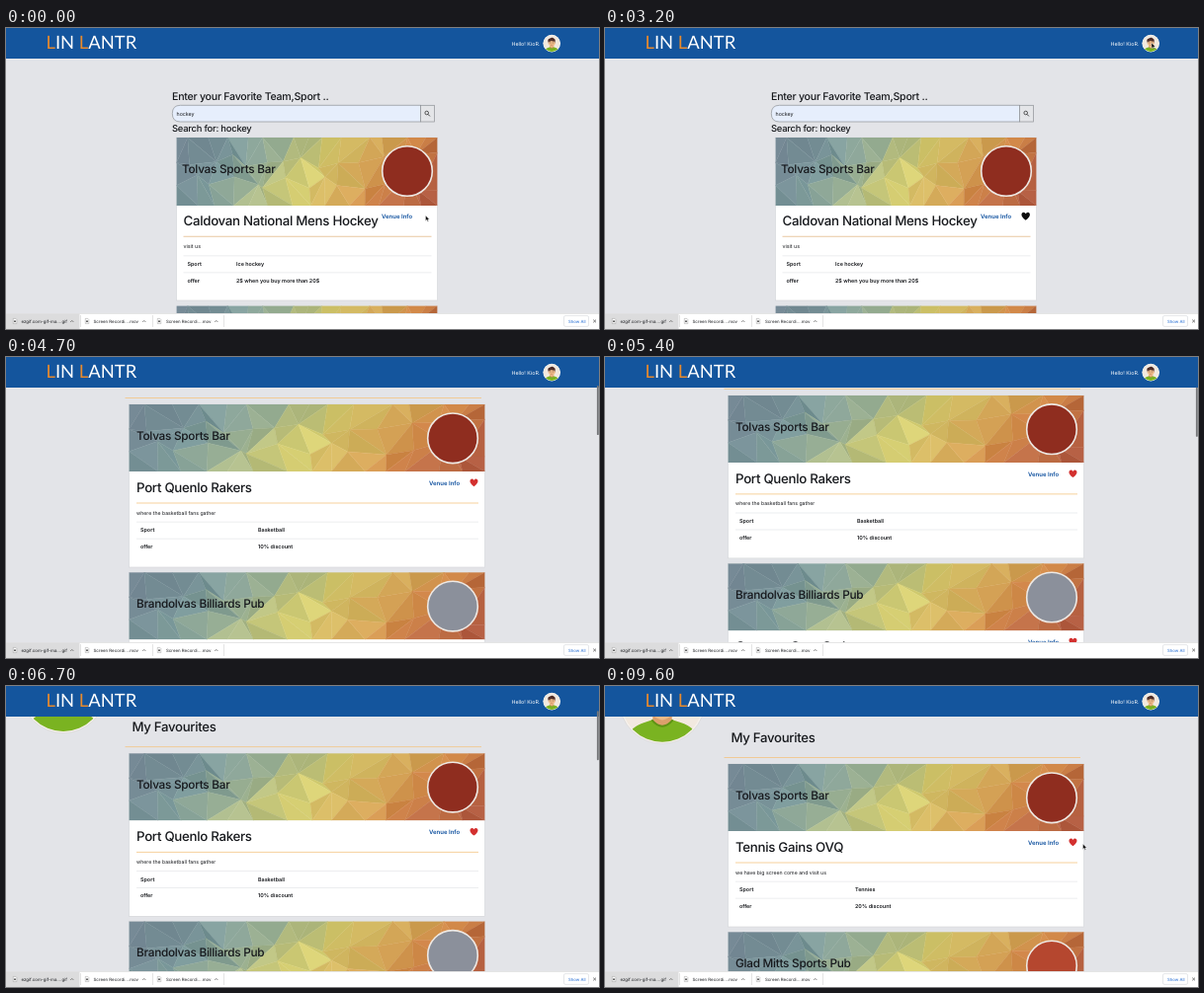
An HTML page for the animation above (9.7 s loop, 600 px wide and 305 px high).

```html
<!DOCTYPE html>
<html lang="en">
<head>
<meta charset="utf-8">
<title>Sports bar finder</title>
<style>
  html, body { margin: 0; width: 100%; height: 100%; overflow: hidden; background: #e3e4e8; }
  svg { display: block; width: 600px; height: 305px; }
  text { font-family: Inter, "Liberation Sans", sans-serif; fill: #16181c; text-rendering: geometricPrecision; white-space: pre; }
  .head { font-weight: 500; letter-spacing: -.023em; }
  .bold { font-weight: 600; }
  .link { font-weight: 600; fill: #0d4f9e; }
  .brand { font-family: Lato, sans-serif; fill: #fff; }
  .brand tspan { fill: #e88a2c; }
</style>
</head>
<body>
<svg id="stage" viewBox="0 0 600 305"></svg>
<script>
const LOOP = 9700, STEP = 100;

function random(seed) {
  return () => (seed = (seed * 16807) % 2147483647) / 2147483647;
}

const rect = (x, y, w, h, fill, more = '') =>
  `<rect x="${x}" y="${y}" width="${w}" height="${h}" fill="${fill}" ${more}/>`;
const text = (x, y, size, str, cls = '', more = '') =>
  `<text x="${x}" y="${y}" font-size="${size}" class="${cls}" ${more}>${str}</text>`;
const path = (d, fill, more = '') => `<path d="${d}" fill="${fill}" ${more}/>`;
const use = (id, transform) => `<use href="#${id}" transform="${transform}"/>`;
const disc = (x, y, r, fill, more = '') => `<circle cx="${x}" cy="${y}" r="${r}" fill="${fill}" ${more}/>`;

// Colour at position u (0..1) along evenly spaced stops
function blend(stops, u, light) {
  const p = Math.min(.999, Math.max(0, u)) * (stops.length - 1);
  const i = Math.floor(p), f = p - i;
  const rgb = stops[i].map((c, k) => Math.round(c + (stops[i + 1][k] - c) * f + light));
  return `rgb(${rgb})`;
}

// Low-poly picture on a jittered grid; tilt slants the colour bands
function lowPoly(w, h, cols, rows, stops, seed, contrast, tilt) {
  const rnd = random(seed), pts = [];
  for (let r = 0; r <= rows; r++) {
    for (let c = 0; c <= cols; c++) {
      const jx = c % cols ? rnd() - .5 : 0, jy = r % rows ? rnd() - .5 : 0;
      pts.push([(c + jx * .8) * w / cols, (r + jy * .7) * h / rows]);
    }
  }
  let out = '';
  const tri = (...ids) => {
    const p = ids.map(i => pts[i]);
    const mx = (p[0][0] + p[1][0] + p[2][0]) / 3 / w, my = (p[0][1] + p[1][1] + p[2][1]) / 3 / h;
    const fill = blend(stops, mx + (my - .5) * tilt + (rnd() - .5) * .06, (rnd() - .5) * contrast);
    const d = 'M' + p.map(q => q.map(v => v.toFixed(1))).join('L') + 'Z';
    out += path(d, fill, `stroke="${fill}" stroke-width=".4"`);
  };
  for (let r = 0; r < rows; r++) {
    for (let c = 0; c < cols; c++) {
      const a = r * (cols + 1) + c, b = a + 1, d = a + cols + 1, e = d + 1;
      if (rnd() < .5) { tri(a, b, d); tri(b, e, d); }
      else { tri(a, b, e); tri(a, e, d); }
    }
  }
  return out;
}

const WARM = [[110, 130, 142], [120, 150, 152], [158, 178, 144], [212, 206, 114],
  [214, 178, 94], [205, 132, 68], [180, 94, 66]];
const PALE = [[226, 140, 112], [236, 168, 126], [240, 202, 142], [238, 222, 164],
  [212, 221, 214], [178, 209, 229], [142, 186, 221]];

const avatar = `<g clip-path="url(#round)">
  ${disc(0, 0, 43, '#f2e9df')}
  ${path('M-40 45C-36 28-24 24-11 20H11C25 24 36 28 40 45Z', '#7ab321')}
  ${path('M-10 8V21Q0 31 10 21V8Z', '#dca06c')}
  ${path('M-11 20Q0 33 11 20', 'none', 'stroke="#5f9315" stroke-width="2"')}
  <ellipse cx="-15" cy="-1" rx="3" ry="5" fill="#e3aa77"/><ellipse cx="15" cy="-1" rx="3" ry="5" fill="#e3aa77"/>
  ${path('M-15-14Q0-22 15-14V1Q13 18 0 20Q-13 18-15 1Z', '#efbb88')}
  ${path('M-16-3C-23-16-18-25-9-26C-2-32 9-29 12-24C20-21 18-10 16-2L13-11Q4-9-1-15Q-6-9-13-10Z', '#4d2c27')}
  ${path('M-10-6h6M4-6h6', 'none', 'stroke="#4d2c27" stroke-width="1.5"')}
  ${disc(-6, -2, 1.5, '#33221f')}${disc(6, -2, 1.5, '#33221f')}
  ${path('M0-1L-2 5H1', 'none', 'stroke="#b8794e" stroke-width="1.2"')}
  ${path('M-6 9Q0 14 6 9', 'none', 'stroke="#8c4a35" stroke-width="1.5"')}
</g>`;

const defs = `<defs>
  <clipPath id="round"><circle r="43"/></clipPath>
  <clipPath id="warmBox"><rect width="360" height="68"/></clipPath>
  <g id="warm" clip-path="url(#warmBox)">${lowPoly(360, 68, 14, 3, WARM, 77, 22, .2)}</g>
  <g id="avatar">${avatar}</g>
  <path id="heart" d="M0 4C-6 0-4.5-4-2.2-4Q-.7-4 0-2.5Q.7-4 2.2-4C4.5-4 6 0 0 4Z"/>
  <g id="file"><path d="M-1.7-2.6H.8L1.8-1.6V2.6H-1.7Z" fill="#fff" stroke="#8a8a8a" stroke-width=".4"/>
    <circle cy=".3" r="1" fill="#555"/></g>
</defs>`;

const badge = (x, y, fill) => disc(x, y, 25.3, fill, 'stroke="#eee9e4" stroke-width="1.6"');
const line = (x, y, w, fill, h = .6) => rect(x, y, w, h, fill);

// Table of two labelled rows starting at its upper rule
const rows = (x, x2, w, y, sport, offer) =>
  line(x, y, w, '#dfe1e4') + line(x, y + 17, w, '#dfe1e4') +
  text(x + 4, y + 10.6, 5.4, 'Sport', 'bold') + text(x2, y + 10.6, 5.4, sport, 'bold') +
  text(x + 4, y + 27.2, 5.4, 'offer', 'bold') + text(x2, y + 27.2, 5.4, offer, 'bold');

const bars = {
  tolvas: ['Tolvas Sports Bar', '#8f2d1f'],
  brand: ['Brandolvas Billiards Pub', '#8b909b'],
  glad: ['Glad Mitts Sports Pub', '#b5472f']
};
const offers = {
  rakers: [bars.tolvas, 'Port Quenlo Rakers', 'where the basketball fans gather', 'Basketball', '10% discount', 255],
  owls: [bars.brand, 'Quarven Grey Owls', 'come and watch with us', 'Baseball', '15% discount', 255],
  tennis: [bars.tolvas, 'Tennis Gains OVQ', 'we have big screen come and visit us', 'Tennies', '20% discount', 253],
  mitts: [bars.glad, 'Quarven Grey Owls', 'come and watch with us', 'Baseball', '15% discount', 255]
};

function card([[bar, logo], title, note, sport, offer, x2], y) {
  return `<g transform="translate(0 ${y})">
    ${rect(124.5, 0, 360, 165, '#fff', 'stroke="#d2d4d8" stroke-width=".6"')}
    ${use('warm', 'translate(124.5 0)')}
    ${text(132, 35.8, 11.8, bar, 'head')}${badge(452, 34.3, logo)}
    ${text(132, 88.7, 13.3, title, 'head')}${text(428, 81.8, 6, 'Venue Info', 'link')}
    <g fill="#d3302f">${use('heart', 'translate(473.5 79.4) scale(.95)')}</g>
    ${line(132, 99.6, 346, '#f4c583', .8)}
    ${text(132, 111.5, 5.2, note)}
    ${rows(132, x2, 346, 118.8, sport, offer)}
  </g>`;
}

const list = (id, ...items) => `<g id="${id}">${items.map((o, i) => card(o, 201 + i * 170.3)).join('')}</g>`;

const searchPage = `<g id="search">
  ${text(168, 73, 10.6, 'Enter your Favorite Team,Sport ..', 'head')}
  ${path('M419.5 78.3H176.5Q168.3 78.3 168.3 86.7T176.5 95H419.5Z', '#e6eefc', 'stroke="#8d9196" stroke-width=".7"')}
  ${rect(419.5, 78.3, 14, 16.7, '#e4e5e8', 'stroke="#8d9196" stroke-width=".7"')}
  ${disc(425.7, 86, 1.8, 'none', 'stroke="#333" stroke-width=".8"')}
  ${path('M427 87.4L428.9 89.4', 'none', 'stroke="#333" stroke-width=".9"')}
  ${text(172.5, 88.6, 5.3, 'hockey')}
  ${text(168, 104.6, 9.4, 'Search for: hockey', 'head')}
  ${rect(172.5, 111, 264, 165, '#fff', 'stroke="#d2d4d8" stroke-width=".6"')}
  ${use('warm', 'translate(172.5 111) scale(.7333 1.015)')}
  ${use('warm', 'translate(172.5 281.5) scale(.7333 1.015)')}
  ${text(178, 147.2, 11.8, bars.tolvas[0], 'head')}${badge(406, 145, bars.tolvas[1])}
  ${text(179.5, 200, 13.3, 'Caldovan National Mens Hockey', 'head')}
  ${text(380, 193.4, 6, 'Venue Info', 'link')}
  <g id="like" fill="#0c0c0c">${use('heart', 'translate(425.7 190.8)')}</g>
  ${line(179.5, 210.8, 251, '#e3b98a', .8)}
  ${text(179.5, 223, 5.3, 'visit us')}
  ${rows(179.5, 233, 251, 230.6, 'Ice hockey', '2$ when you buy more than 20$')}
</g>`;

const profilePage = `<g id="profile">
  <g transform="translate(0 31)">${lowPoly(600, 113, 16, 4, PALE, 4211, 14, .12)}</g>
  ${disc(58, 137, 43.3, '#f6f1ec', 'stroke="#d5d3d2" stroke-width=".6"')}
  ${use('avatar', 'translate(58 137) scale(.97)')}
  ${text(127.5, 178.6, 13.2, 'My Favourites', 'head')}
  ${line(120.5, 194, 360.5, '#f4c583', .8)}
  ${list('listA', offers.rakers, offers.owls)}
  ${list('listB', offers.owls, offers.tennis)}
  ${list('listC', offers.tennis, offers.mitts)}
</g>`;

const header = `${rect(0, 0, 600, 31, '#14559d')}
  ${text(40.5, 21.4, 18.4, '<tspan>L</tspan>IN <tspan>L</tspan>ANTR', 'brand')}
  ${text(511.5, 17.6, 5.3, 'Hello! KioR.', '', 'style="fill:#fff"')}
  ${disc(552.2, 15.6, 8.8, '#fff')}${use('avatar', 'translate(552.2 15.6) scale(.198)')}`;

const download = (x, name, icon, arrow) => use('file', `translate(${icon} 297)`) +
  text(x, 298.7, 4.4, name) +
  path(`M${arrow} 298l1.6-1.6l1.6 1.6`, 'none', 'stroke="#555" stroke-width=".7"');

const shelf = `${rect(0, 289, 600, 16, '#fff')}${line(0, 289, 600, '#d4d4d4')}
  ${rect(0, 289.5, 74.5, 15.5, '#dcdcdd')}
  ${[75, 148, 220].map(x => rect(x, 291, .6, 12, '#d0d0d0')).join('')}
  ${download(15.5, 'ezgif.com-gif-ma....gif', 9, 65.2)}
  ${download(88.5, 'Screen Recordi....mov', 82, 138.2)}
  ${download(162, 'Screen Recordi....mov', 155, 211.2)}
  ${rect(564.5, 291.6, 25, 10.8, '#fff', 'rx="1.5" stroke="#d3d6da" stroke-width=".6"')}
  ${text(569, 298.7, 4.3, 'Show All', '', 'style="fill:#1a66d2"')}
  ${path('M594.2 295.6l2.8 2.8m0-2.8l-2.8 2.8', 'none', 'stroke="#444" stroke-width=".7"')}`;

const pointer = path('M0 0V5.4L1.3 4.3L2.2 6.2L3.1 5.8L2.2 4H3.9Z', '#0a0a0a',
  'id="pointer" stroke="#fff" stroke-width=".4"');

document.getElementById('stage').innerHTML = defs + rect(0, 0, 600, 305, '#e3e4e8') +
  searchPage + profilePage + header + shelf +
  rect(597.9, 0, 1.9, 50, '#757679', 'id="bar" rx=".9"') + pointer;

// Keys: time, value(s)
const scrollKeys = [[4000, 0], [4600, 153], [5100, 153], [5800, 176], [6200, 176], [6900, 122]];
const pointerKeys = [[0, 424.5, 190], [900, 424.5, 190], [1700, 573.5, 3.5], [2100, 573.5, 3.5],
  [2800, 553, 15], [3300, 553, 15], [3800, 470, 62], [4100, 470, 62], [4500, 473, 110],
  [6900, 490, 180], [7500, 483.5, 164], [7800, 483.5, 164], [8100, 475, 159],
  [9000, 475, 159], [9400, 483.5, 160]];

function at(keys, t) {
  const i = keys.findIndex(k => k[0] > t);
  if (i === 0) return keys[0].slice(1);
  if (i < 0) return keys[keys.length - 1].slice(1);
  const a = keys[i - 1], b = keys[i], u = (t - a[0]) / (b[0] - a[0]), e = u * u * (3 - 2 * u);
  return a.slice(1).map((v, k) => v + (b[k + 1] - v) * e);
}

const el = id => document.getElementById(id);
const parts = Object.fromEntries(['search', 'profile', 'like', 'listA', 'listB', 'listC', 'bar', 'pointer']
  .map(id => [id, el(id)]));
const show = (id, on) => { parts[id].style.display = on ? '' : 'none'; };

function draw(now) {
  const t = Math.floor((now % LOOP) / STEP) * STEP;
  const [scroll] = at(scrollKeys, t), [px, py] = at(pointerKeys, t);
  show('search', t < 3300);
  show('profile', t >= 3300);
  show('like', t >= 600);
  show('listA', t < 8200);
  show('listB', t >= 8200 && t < 9000);
  show('listC', t >= 9000);
  show('bar', t > 4000 && t < 7900);
  show('pointer', t < 4500 || t >= 7000);
  parts.profile.setAttribute('transform', `translate(0 ${-scroll.toFixed(1)})`);
  parts.bar.setAttribute('y', scroll * .19);
  parts.pointer.setAttribute('transform', `translate(${px} ${py})`);
}

function tick() {
  draw(performance.now());
  requestAnimationFrame(tick);
}
tick();
</script>
</body>
</html>
```
